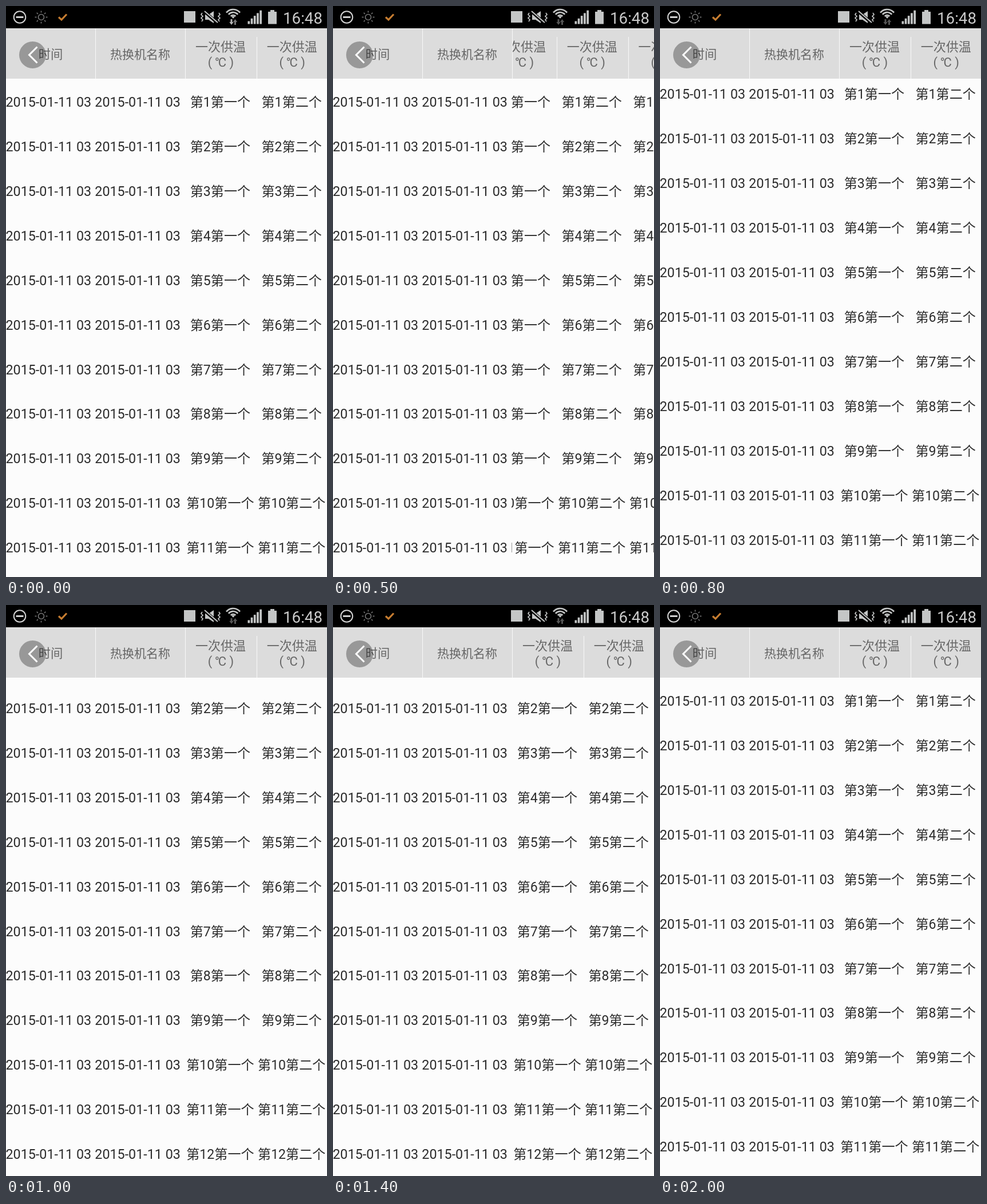
Animation of 561x998 px, one loop 2.4 s. Source, as an HTML page with a canvas:

```html
<!DOCTYPE html>
<html lang="zh-CN">
<head>
<meta charset="utf-8">
<style>
html, body { margin: 0; width: 100%; height: 100%; overflow: hidden; background: #fcfcfc; }
canvas { display: block; }
</style>
</head>
<body>
<canvas id="stage" width="561" height="998"></canvas>
<script>
const ctx = document.getElementById('stage').getContext('2d');
const W = 561, H = 998, LOOP = 2400;
const HEAD_TOP = 39.5, HEAD_BOTTOM = 127, FIXED_W = 312, COL_W = 124.8, ROW_H = 77.97, ROWS = 12;
const ORDINALS = '一二三四五六七八';
const FONT = 'Roboto, "Noto Sans CJK SC", "Noto Sans CJK", sans-serif';
const ICON = '#c4c6c6';

// [start ms, scroll x, scroll y]
const SCROLL = [
  [0, 0, 0], [300, 16, 0], [400, 36, 0], [500, 47, 0], [600, 30, 0], [700, 8, 0],
  [800, 0, 13.5], [900, 0, 38], [1000, 0, 65], [1500, 0, 0], [1700, 749.8, 0],
  [1900, 300, 0], [2000, 0, 0]
];

function rect(x, y, w, h, color) {
  ctx.fillStyle = color;
  ctx.fillRect(x, y, w, h);
}

function label(str, x, y, size, color, align = 'center') {
  ctx.font = `${size}px ${FONT}`;
  ctx.fillStyle = color;
  ctx.textAlign = align;
  ctx.fillText(str, x, y);
}

function shape(d, color, width) {
  const path = new Path2D(d);
  if (width) {
    ctx.strokeStyle = color;
    ctx.lineWidth = width;
    ctx.stroke(path);
  } else {
    ctx.fillStyle = color;
    ctx.fill(path);
  }
}

function arc(x, y, r, from, to, color, width) {
  ctx.beginPath();
  ctx.arc(x, y, r, from, to);
  ctx.strokeStyle = color;
  ctx.lineWidth = width;
  ctx.stroke();
}

function clipped(x, y, w, h, draw) {
  ctx.save();
  ctx.beginPath();
  ctx.rect(x, y, w, h);
  ctx.clip();
  draw();
  ctx.restore();
}

function drawStatusBar(active) {
  rect(0, 0, W, 39, '#000');
  arc(24, 19.5, 10.3, 0, 7, '#d2d2d2', 2);
  rect(17.5, 18, 13, 3, '#d2d2d2');

  arc(61.5, 19.5, 5, 0, 7, '#777', 1.6);
  for (let i = 0; i < 8; i++) {
    const c = Math.cos(i * Math.PI / 4), s = Math.sin(i * Math.PI / 4);
    shape(`M${61.5 + 8 * c} ${19.5 + 8 * s}L${61.5 + 11 * c} ${19.5 + 11 * s}`, '#777', 1.6);
  }
  shape('M92 19.5L97 24L106 14.5', '#c77d31', 3.2);

  rect(311, 9, 20, 20, ICON);

  // muted speaker between two vibration marks
  shape('M348 15h6l9-6v21l-9-6h-6z', ICON);
  shape('M346 9L370 30', '#000', 5);
  shape('M347 9L370 29', ICON, 2);
  shape('M343 12l-2 3 3 3-3 3 3 3-2 3M372 12l2 3-3 3 3 3-3 3 2 3', ICON, 1.7);

  for (const r of [5.5, 10.5, 15.5]) arc(397, 21.5, r, -Math.PI * .78, -Math.PI * .22, ICON, 2.7);
  shape('M397 22l-3-3.5q3-2 6 0z', ICON);
  shape('M392.5 23h3v5h2.2l-3.7 5-3.7-5h2.2z', active ? '#b4b4b4' : '#555');
  shape('M399 33h3v-5h2.2l-3.7-5-3.7 5h2.2z', active ? '#777' : '#555');

  for (let i = 0; i < 5; i++) rect(422.5 + i * 5.2, 26.5 - i * 4.7, 3.7, 5 + i * 4.7, ICON);
  rect(462, 7, 7, 4, ICON);
  rect(458, 10, 15, 21.5, ICON);
  label('16:48', 518.5, 30.5, 27.7, '#cacaca');
}

function drawHeader(scrollX) {
  rect(0, HEAD_TOP, W, HEAD_BOTTOM - HEAD_TOP, '#dcdcdc');
  label('时间', 78, 91.5, 21.3, '#666');
  label('热换机名称', 234.5, 91.5, 21, '#666');
  rect(156, HEAD_TOP, 1, 87.5, '#f8f8f8');
  clipped(313, HEAD_TOP, W, 87.5, () => {
    for (let i = 0; i < ORDINALS.length; i++) {
      const x = FIXED_W + 1 + i * COL_W - scrollX;
      label('一次供温', x + 62, 78.5, 22, '#666');
      label('( ℃ )', x + 62.5, 106, 22, '#666');
      if (i) rect(Math.round(x), 54, 1, 73, '#f8f8f8');
    }
  });
  rect(313, HEAD_TOP, 1, 87.5, '#f8f8f8');

  ctx.beginPath();
  ctx.arc(46.5, 85.5, 23.5, 0, 7);
  ctx.fillStyle = 'rgba(0,0,0,.31)';
  ctx.fill();
  shape('M54.5 71.5L40.5 85.5L54.5 99.5', '#fff', 3);
}

function drawRows(scrollX, scrollY) {
  const eachRow = draw => {
    for (let i = 0; i < ROWS; i++) draw(i + 1, 175.7 + i * ROW_H - scrollY);
  };
  clipped(0, HEAD_BOTTOM, W, H, () => eachRow((n, y) => {
    for (const x of [-.5, 155.3]) label('2015-01-11 03', x, y, 23.3, '#2c2c2c', 'left');
  }));
  clipped(FIXED_W, HEAD_BOTTOM, W, H, () => eachRow((n, y) => {
    [...ORDINALS].forEach((ordinal, i) =>
      label(`第${n}第${ordinal}个`, FIXED_W + (i + .5) * COL_W - scrollX, y, 23.1, '#2c2c2c'));
  }));
}

function frame() {
  const t = performance.now() % LOOP;
  const [, scrollX, scrollY] = SCROLL.findLast(([start]) => t >= start);
  rect(0, 0, W, H, '#fcfcfc');
  drawRows(scrollX, scrollY);
  drawHeader(scrollX);
  drawStatusBar(t < 100 || t >= 1500);
  requestAnimationFrame(frame);
}
frame();
</script>
</body>
</html>
```
